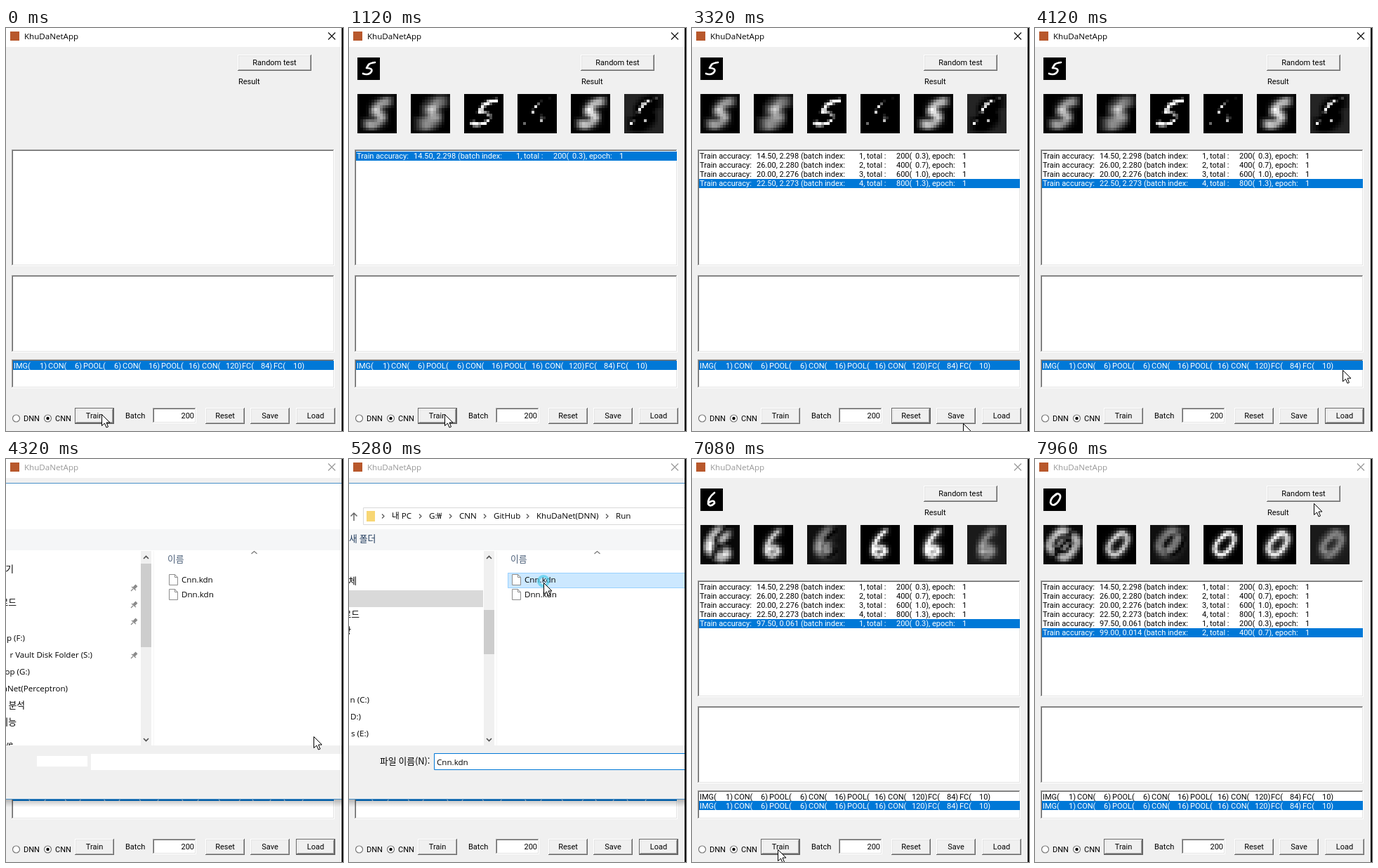
An HTML page with a canvas for the animation above (8000 ms loop, 480 by 574 pixels).

```html
<!DOCTYPE html>
<html lang="ko">
<head>
<meta charset="utf-8">
<title>KhuDaNetApp</title>
<style>
html, body { margin: 0; width: 100%; height: 100%; overflow: hidden; background: #f0f0f0; }
canvas { display: block; }
</style>
</head>
<body>
<canvas id="stage" width="480" height="574"></canvas>
<script>
const LOOP = 8000, STEP = 40;
const FACE = '#f0f0f0', PAPER = '#fff', BLUE = '#0078d7', GREY = '#999';
const UI = '11px Roboto, "Open Sans", sans-serif';
const SHELL = '11.6px "Open Sans", "Noto Sans CJK KR", "Noto Sans CJK JP", sans-serif';
const HANGUL = '12.8px "Noto Sans CJK KR", "Noto Sans CJK JP", sans-serif';
const OPEN = 4140, LOADED = 4400, SELECT = 5120, BUSY = 5200, CLOSE = 5440;

const ctx = document.getElementById('stage').getContext('2d');
const small = document.createElement('canvas');
small.width = small.height = 14;
const smallCtx = small.getContext('2d', { willReadFrequently: true });

const glyphs = [
  'M19 8Q10 13 10 20Q13 27 20 20Q27 11 22 8Q19 6 15 11',
  'M20 7L13 26',
  'M10 11Q17 4 21 9Q20 16 9 23Q14 21 22 24',
  'M11 9Q19 5 20 10Q19 14 14 16Q22 17 18 22Q14 26 8 23',
  'M12 8L9 17Q15 18 21 15M22 8L17 26',
  'M25 7Q18 8 16 10L13 15Q22 15 20 20Q16 26 8 23',
  'M20 6Q10 14 11 22Q14 27 20 21Q20 15 12 20',
  'M9 11Q8 15 13 14T23 10Q18 18 14 27',
  'M21 9Q14 5 12 11Q14 15 19 19Q18 27 12 24Q10 20 18 15Q22 12 21 9',
  'M21 10Q15 6 11 13Q14 18 21 11Q18 19 16 26'
].map(d => new Path2D(d));

// p: ink, b: 3x3 blur, w: 5x5 blur, each sampled at an offset
const untrained = [
  (p, b, w) => b() * .6 + w() * .3,
  (p, b, w) => w() * .75 + b(-1, 0) * .25,
  (p, b) => p() * 1.5 - b(-1, -1) * .9,
  (p, b) => p() * 2 - p(-1, 0) * 1.9 - b(1, 0) * 1.1,
  (p, b, w) => b() * .8 + w() * .25,
  (p, b, w) => Math.max(.14 - w() * .45, 2 * p() - 2.6 * p(-1, 0) - 2.2 * p(0, -1))
];
const trained = [
  (p, b) => Math.abs(b(2, 1) - b(-1, -1)) * .9 + .03,
  (p, b, w) => p() * .35 + b() * .5 + w() * .1,
  (p, b, w) => .06 + b(1, 1) * .4 + w() * .25 - p(-1, 0) * .15,
  (p, b) => p() * .6 + b() * .45,
  (p, b, w) => p() * .4 + b() * .55 + w() * .2,
  (p, b, w) => .1 + b() * .5 + w(-1, 0) * .1 - p(1, 0) * .1
];
const runs = [
  { first: 3, last: 78, phase: 9, maps: untrained },
  { first: 157, last: 199, phase: 7, maps: trained }
];

// time, accuracy and loss, batch, total, percent
const logRows = [
  [740, '14.50, 2.298', 1, 200, '0.3'],
  [1440, '26.00, 2.280', 2, 400, '0.7'],
  [2140, '20.00, 2.276', 3, 600, '1.0'],
  [2840, '22.50, 2.273', 4, 800, '1.3'],
  [6960, '97.50, 0.061', 1, 200, '0.3'],
  [7640, '99.00, 0.014', 2, 400, '0.7']
];
const layers = [
  ['IMG(', 11], ['1)', 48], ['CON(', 60], ['6)', 98], ['POOL(', 110], ['6)', 154],
  ['CON(', 166], ['16)', 203], ['POOL(', 221], ['16)', 260], ['CON(', 279],
  ['120)', 313], ['FC(', 336], ['84)', 363], ['FC(', 381], ['10)', 409]
];
const buttons = [
  ['Random test', 330, 38, 105], ['Train', 98, 541, 56], ['Reset', 284, 541, 56],
  ['Save', 348, 541, 56], ['Load', 413, 541, 56]
];
const focusSteps = [[0, 'Train'], [3080, 'Reset'], [3760, 'Load'], [6160, 'Train']];
const pointer = [
  [0, 136, 550], [2240, 136, 550], [2800, 312, 558], [3120, 318, 558], [3320, 386, 563],
  [3640, 436, 555], [3960, 438, 553], [4320, 438, 395], [4800, 300, 205], [4960, 300, 205],
  [5120, 277, 176], [5400, 277, 176], [6080, 123, 555], [6200, 122, 556], [7460, 122, 556],
  [7960, 397, 63], [8000, 397, 63]
];

function box(x, y, w, h, color) {
  ctx.fillStyle = color;
  ctx.fillRect(x, y, w, h);
}
function text(s, x, y, color = '#000', font = UI, align = 'left') {
  ctx.font = font;
  ctx.textAlign = align;
  ctx.fillStyle = color;
  ctx.fillText(s, x, y);
}
function line(d, color, width = 1) {
  ctx.strokeStyle = color;
  ctx.lineWidth = width;
  ctx.stroke(new Path2D(d));
}
function bevel(x, y, w, h, light, dark) {
  box(x, y, w, 1, light);
  box(x, y, 1, h, light);
  box(x, y + h - 1, w, 1, dark);
  box(x + w - 1, y, 1, h, dark);
}
function sunken(x, y, w, h) {
  box(x, y, w, h, PAPER);
  bevel(x, y, w, h, '#a0a0a0', '#fff');
  bevel(x + 1, y + 1, w - 2, h - 2, '#696969', '#e3e3e3');
}
function button([label, x, y, w], focused) {
  const h = 23;
  box(x, y, w, h, FACE);
  if (focused) {
    bevel(x, y, w, h, '#646464', '#646464');
    x++; y++; w -= 2;
  }
  const bottom = focused ? h - 2 : h;
  bevel(x, y, w, bottom, '#fff', '#696969');
  bevel(x + 1, y + 1, w - 2, bottom - 2, '#e3e3e3', '#a0a0a0');
  text(label, x + w / 2, focused ? y + 14 : y + 15, '#000', UI, 'center');
}
function radio(x, label, on) {
  ctx.beginPath();
  ctx.arc(x, 556, 5, 0, 7);
  ctx.fillStyle = PAPER;
  ctx.fill();
  ctx.strokeStyle = '#777';
  ctx.lineWidth = 1.2;
  ctx.stroke();
  if (on) {
    ctx.beginPath();
    ctx.arc(x, 556, 2.2, 0, 7);
    ctx.fillStyle = '#000';
    ctx.fill();
  }
  text(label, x + 10.5, 560);
}

function drawGlyph(g, digit) {
  g.strokeStyle = '#fff';
  g.lineWidth = 2.7;
  g.lineCap = g.lineJoin = 'round';
  g.stroke(glyphs[digit]);
}
function sampler(read) {
  return (x, y) => (dx = 0, dy = 0) => read(x + dx, y + dy);
}
function blurOf(read, r) {
  return (x, y) => {
    let sum = 0;
    for (let j = -r; j <= r; j++) for (let i = -r; i <= r; i++) sum += read(x + i, y + j);
    return sum / (2 * r + 1) ** 2 * 1.5;
  };
}
function drawNetwork(t) {
  const step = Math.floor(t / STEP);
  const run = runs.filter(r => step >= r.first).pop();
  if (!run) return;
  const digit = (7 * Math.min(step, run.last) + run.phase) % 10;

  box(12, 42, 32, 32, '#000');
  ctx.save();
  ctx.translate(12, 42);
  drawGlyph(ctx, digit);
  ctx.restore();

  smallCtx.setTransform(1, 0, 0, 1, 0, 0);
  smallCtx.clearRect(0, 0, 14, 14);
  smallCtx.setTransform(.5, 0, 0, .5, -1, -1);
  drawGlyph(smallCtx, digit);
  const data = smallCtx.getImageData(0, 0, 14, 14).data;
  const ink = (x, y) => x < 0 || y < 0 || x > 13 || y > 13 ? 0 : data[(y * 14 + x) * 4 + 3] / 255;
  const samplers = [ink, blurOf(ink, 1), blurOf(ink, 2)].map(sampler);

  run.maps.forEach((map, k) => {
    const left = 12 + 76 * k;
    for (let y = 0; y < 14; y++) for (let x = 0; x < 14; x++) {
      const v = Math.max(0, Math.min(1, map(...samplers.map(s => s(x, y))))) * 255;
      box(left + x * 4, 94 + y * 4, 4, 4, `rgb(${v},${v},${v})`);
    }
  });
}

function drawLog(t) {
  const shown = logRows.filter(r => t >= r[0]);
  shown.forEach(([, score, batch, total, part], i) => {
    const y = 175 + 13 * i, last = i === shown.length - 1;
    const color = last ? '#fff' : '#000';
    if (last) box(10, y + 1, 457, 13, BLUE);
    [['Train accuracy:', 11], [score + ' (batch index:', 92], [batch + ', total :', 238],
     [total + '(', 291], [part + '), epoch:', 318], ['1', 385]]
      .forEach(([s, x]) => text(s, x, y + 11, color));
  });
}
function drawLayers(t) {
  const count = t < CLOSE ? 1 : 2;
  for (let i = 0; i < count; i++) {
    const last = i === count - 1;
    if (last) box(10, 474 + 13 * i, 457, 13, BLUE);
    layers.forEach(([s, x]) => text(s, x, 485 + 13 * i, last ? '#fff' : '#000'));
  }
}

function drawWindow(t) {
  box(0, 0, 480, 574, FACE);
  const active = t < OPEN;
  box(0, 0, 478, 27, PAPER);
  box(6, 5, 13, 13, '#b8582c');
  text('KhuDaNetApp', 26, 16, active ? '#000' : GREY, SHELL);
  line('M459 6.5L469 16.5M469 6.5L459 16.5', active ? '#111' : GREY, 1.2);

  const focus = focusSteps.filter(f => t >= f[0]).pop()[1];
  buttons.forEach(b => button(b, b[0] === focus));
  text('Result', 331, 80);
  drawNetwork(t);
  sunken(8, 173, 460, 166);
  drawLog(t);
  sunken(8, 352, 460, 110);
  sunken(8, 472, 460, 41);
  drawLayers(t);
  radio(14.5, 'DNN', false);
  radio(59.5, 'CNN', true);
  text('Batch', 170, 556);
  sunken(209, 541, 62, 22);
  text('200', 268, 556, '#000', UI, 'right');
}

function shellText(s, x, middle, color, align) {
  text(s, x, middle + 4, color, /[가-힣]/.test(s) ? HANGUL : SHELL, align);
}
function drawPin(y) {
  line(`M178 ${y + 5}L181 ${y + 2}M179 ${y - 1}L185 ${y + 4}`, '#8a8a8a', 1.2);
  line(`M182 ${y + 1}L186 ${y - 3}`, '#8a8a8a', 4);
}
// Labels run off the left edge, so each is placed by its right end.
function drawTree(loaded) {
  const items = loaded
    ? [['체', 11, 174], ['로드', 15, 222], ['상', 3, 245], ['n (C:)', 29, 343], ['D:)', 17, 367], ['s (E:)', 28, 391]]
    : [['기', 11, 157], ['로드', 15, 205], ['p (F:)', 27, 255], ['r Vault Disk Folder (S:)', 123, 279],
       ['op (G:)', 34, 303], ['aNet(Perceptron)', 88, 327], ['분석', 27, 351], ['기능', 15, 375], ['ve', 10, 406]];
  if (loaded) box(0, 187, 191, 24, '#d9d9d9');
  items.forEach(([s, x, y]) => shellText(s, x, y, '#000', 'right'));
  if (!loaded) [183, 207, 231, 279].forEach(drawPin);

  box(192, 131, 15, 277, FACE);
  const [top, height] = loaded ? [215, 63] : [149, 119];
  box(192, top, 15, height, '#cdcdcd');
  line('M196 142L199.5 138.5L203 142M196 398L199.5 401.5L203 398', '#505050', 1.6);
  box(210, 131, 1, 277, '#f5f5f5');
}
function drawFile(name, y) {
  ctx.fillStyle = '#fff';
  const sheet = `M232.5 ${y - 7.5}H240.5L244.5 ${y - 3.5}V${y + 7.5}H232.5Z`;
  ctx.fill(new Path2D(sheet));
  line(sheet + `M240.5 ${y - 7.5}V${y - 3.5}H244.5`, '#8c8c8c');
  shellText(name, 250, y);
}
function drawAddress() {
  line('M480 69.5H20.5V93.5H480', '#d9d9d9');
  line('M7 88V77M2.5 81.5L7 77L11.5 81.5', '#666', 1.5);
  box(25, 74, 12, 15, '#f8d775');
  [['내 PC', 61], ['G:₩', 114], ['CNN', 157], ['GitHub', 206], ['KhuDaNet(DNN)', 267], ['Run', 380]]
    .forEach(([s, x]) => {
      text(s, x, 85, '#000', SHELL);
      line(`M${x - 14} 78.5L${x - 11} 81.5L${x - 14} 84.5`, '#555', 1.2);
    });
  shellText('새 폴더', 0, 114, '#1e395b');
}
function drawDialog(t) {
  const fade = Math.min((t - OPEN) / 120, (CLOSE + 120 - t) / 120, 1);
  if (fade <= 0) return;
  const loaded = t >= LOADED, selected = t >= SELECT;
  ctx.save();
  ctx.globalAlpha = fade;
  box(0, 35, 480, 450, PAPER);
  box(0, 100, 480, 30, '#f5f6f7');
  if (loaded) drawAddress();
  drawTree(loaded);

  shellText('이름', 230, 143, '#4c607a');
  line('M349.5 135L353.5 131.5L357.5 135', '#777', 1.2);
  if (selected) {
    box(226, 162, 254, 22, '#cce8ff');
    line('M480 162.5H226.5V183.5H480', '#99d1ff');
  }
  drawFile('Cnn.kdn', 172);
  drawFile('Dnn.kdn', 193);

  box(0, 408, 480, 76, FACE);
  box(121, 420, 359, 23, PAPER);
  if (loaded) {
    shellText('파일 이름(N):', 44, 431);
    line('M480 419.5H121.5V442.5H480', selected ? BLUE : '#aaa');
    if (selected) shellText('Cnn.kdn', 125, 432);
  } else {
    box(44, 423, 72, 15, PAPER);
  }
  box(0, 34, 480, 1, '#4a90c8');
  box(0, 484, 480, 1, '#4a90c8');
  const shadow = ctx.createLinearGradient(0, 485, 0, 496);
  shadow.addColorStop(0, 'rgba(0,0,0,.25)');
  shadow.addColorStop(1, 'rgba(0,0,0,0)');
  box(0, 485, 478, 11, shadow);
  ctx.restore();
}

function drawPointer(t) {
  const i = pointer.findIndex(p => p[0] > t);
  const [t0, x0, y0] = pointer[i - 1], [t1, x1, y1] = pointer[i];
  const u = (t - t0) / (t1 - t0), e = u * u * (3 - 2 * u);
  const x = Math.round(x0 + (x1 - x0) * e), y = Math.round(y0 + (y1 - y0) * e);
  if (t >= BUSY && t < CLOSE) {
    ctx.beginPath();
    ctx.arc(x, y - 2, 7, 0, 7);
    ctx.strokeStyle = 'rgba(80,205,235,.7)';
    ctx.lineWidth = 4;
    ctx.stroke();
  }
  ctx.save();
  ctx.translate(x + .5, y + .5);
  const arrow = 'M0 0V16L4 12.5L6.5 18.5L9 17.5L6.5 11.5H11.5Z';
  ctx.fillStyle = '#fff';
  ctx.fill(new Path2D(arrow));
  line(arrow, '#000');
  ctx.restore();
}

function render(now) {
  const t = Math.floor((now % LOOP) / STEP) * STEP;
  drawWindow(t);
  drawDialog(t);
  box(478, 0, 2, 574, '#000');
  drawPointer(t);
}
const start = performance.now();
function tick() {
  render(performance.now() - start);
  requestAnimationFrame(tick);
}
tick();
</script>
</body>
</html>
```
